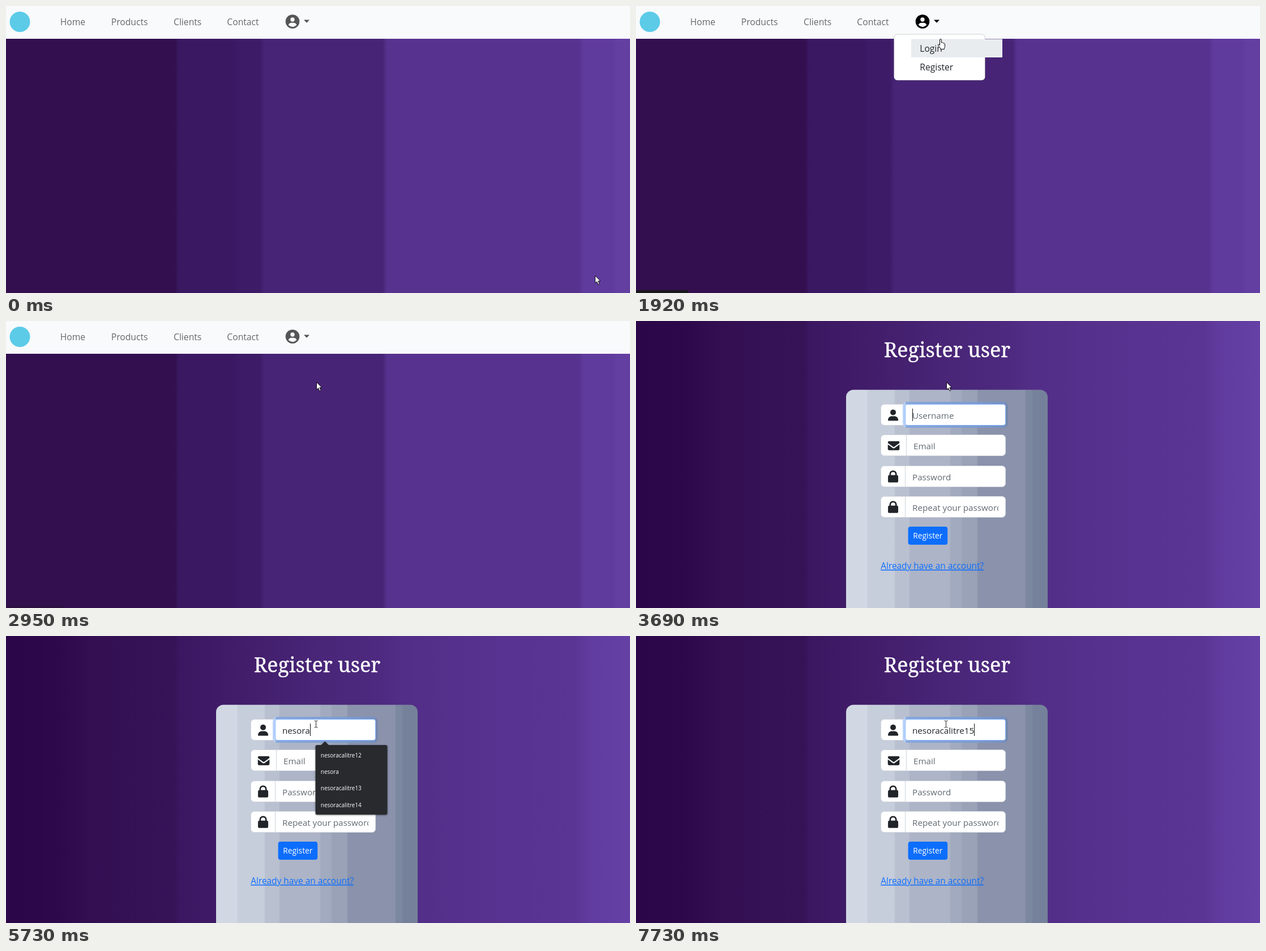
Write an HTML page that moves like this. It is 1102x508 px and loops after 8000 ms.

```html
<!DOCTYPE html>
<html lang="en">
<head>
<meta charset="utf-8">
<title>Register user</title>
<style>
  html, body { margin: 0; width: 100%; height: 100%; overflow: hidden; }
  svg { display: block; }
  #stage { width: 100vw; height: 100vh; font: 15.2px "Open Sans", "Noto Sans", sans-serif; }
  .nav { font-size: 15.7px; fill: #67686a; }
  .item { font-size: 15.6px; fill: #212529; }
  .hint { fill: #626a72; }
  .dark { fill: #212529; }
  .title { font: 36px "Noto Serif", Georgia, serif; fill: #fff; stroke: #fff; stroke-width: .4px; text-anchor: middle; }
  .link { font-size: 15.4px; fill: #0d6efd; text-decoration: underline; }
  .button { font-size: 13.8px; fill: #fff; }
  .option { font-size: 10px; fill: #fff; }
</style>
</head>
<body>
<svg id="stage" viewBox="0 0 1102 508" preserveAspectRatio="none">
  <defs>
    <linearGradient id="homeFill" gradientUnits="userSpaceOnUse" x1="0" x2="1102" y1="0" y2="0"></linearGradient>
    <linearGradient id="formFill" gradientUnits="userSpaceOnUse" x1="0" x2="1102" y1="0" y2="0"></linearGradient>
    <linearGradient id="cardFill" gradientUnits="userSpaceOnUse" x1="0" x2="1102" y1="0" y2="0"></linearGradient>
    <linearGradient id="ringFill" gradientUnits="userSpaceOnUse" x1="0" x2="1102" y1="0" y2="0"></linearGradient>
    <g id="lock">
      <path d="M-5.2-2v-2.8a5.2 5.2 0 0 1 10.4 0V-2" fill="none" stroke="#212529" stroke-width="2.7"/>
      <rect x="-9" y="-3" width="18" height="13" rx="2.6"/>
    </g>
    <g id="person">
      <circle cy="-5" r="5"/>
      <path d="M-9 8.6C-9 4.2-5.8 1.8-2 1.8H2C5.8 1.8 9 4.2 9 8.6Q9 9.8 7.8 9.8H-7.8Q-9 9.8-9 8.6Z"/>
    </g>
    <g id="mail">
      <path d="M-10.3-6q0-2 2-2H8.3q2 0 2 2 0 1-.8 1.7L.9 2q-.9.6-1.8 0L-9.5-4.3q-.8-.7-.8-1.7Z"/>
      <path d="M-10.3-2.3-1.8 4q1.8 1.2 3.6 0l8.5-6.3V5.5q0 2.5-2.5 2.5H-7.8q-2.5 0-2.5-2.5Z"/>
    </g>
  </defs>

  <g id="home">
    <rect width="1102" height="508" fill="url(#homeFill)"/>
    <rect width="1102" height="58" fill="#f8fafc"/>
    <circle cx="24.5" cy="28" r="18" fill="#5ccbe8"/>
    <g class="nav">
      <text x="95.7" y="34">Home</text>
      <text x="185.7" y="34">Products</text>
      <text x="296" y="34">Clients</text>
      <text x="390.3" y="34">Contact</text>
    </g>
    <g id="account">
      <circle cx="506" cy="27.5" r="12.3"/>
      <path d="M526 24.5h10l-5 5.3Z"/>
      <g fill="#f8fafc">
        <circle cx="506" cy="24" r="3.7"/>
        <path d="M498.7 33.8Q500 29.8 504 29.8H508Q512 29.8 513.3 33.8Q506 40 498.7 33.8Z"/>
      </g>
    </g>
    <g id="menu">
      <rect x="455.5" y="50" width="161" height="81.5" rx="6" fill="#fff" stroke="#000" stroke-opacity=".18"/>
      <rect id="loginRow" x="486" y="58.5" width="161" height="32.5"/>
      <rect id="registerRow" x="486" y="91" width="161" height="32.5"/>
      <text class="item" x="501.3" y="81">Login</text>
      <text class="item" id="registerItem" x="501.3" y="113.5">Register</text>
    </g>
    <path id="status" fill="#19181c"/>
  </g>

  <g id="form">
    <rect width="1102" height="508" fill="url(#formFill)"/>
    <text class="title" x="549.5" y="63.5">Register user</text>
    <rect x="371" y="121.7" width="356" height="410" rx="13" fill="url(#cardFill)"/>
    <g id="fields"></g>
    <rect x="473" y="145" width="182" height="42" rx="6" fill="none" stroke="url(#ringFill)" stroke-width="4"/>
    <rect x="475.5" y="147.5" width="177" height="37" rx="4" fill="#fff" stroke="#86b7fe"/>
    <text class="hint" id="userHint" x="488" y="172.8">Username</text>
    <text class="dark" id="typed" x="488" y="172.8"></text>
    <rect id="caret" y="155" width="1" height="22" fill="#111"/>
    <rect x="480.6" y="364" width="69.6" height="32" rx="4" fill="#0d6efd"/>
    <text class="button" x="489.3" y="385">Register</text>
    <text class="link" x="432.3" y="439">Already have an account?</text>
    <g id="popup">
      <path id="popupBox" fill="#292a2d" style="filter: drop-shadow(0 1px 1.5px #0006)"/>
      <g id="options"></g>
    </g>
  </g>

  <g id="arrow">
    <path d="M.5.5V13.5L3.5 10.7 5.7 15.7 8 14.7 5.8 9.8H10Z" fill="#fff" stroke="#000" stroke-width=".9"/>
  </g>
  <g id="hand">
    <path d="M3.5 11.5V2Q3.5.5 4.9.5T6.3 2V6.5Q8.3 6 8.6 7.3 10.4 6.8 10.8 8.2 12.5 8 12.5 9.8V13.5Q12.5 15 11.3 16.8V18.5H4.8V17Q2 14 .7 11.5 .3 9.6 1.8 9.7Z" fill="#fff" stroke="#000"/>
  </g>
  <g id="beam">
    <path d="M.5.5H2.5L3.5 1.5 4.5.5H6.5M3.5 1.5V11.5M.5 12.5H2.5L3.5 11.5 4.5 12.5H6.5" fill="none" stroke="#222"/>
  </g>
</svg>

<script>
const LOOP = 8000;
const NAME = "nesoracalitre";
const $ = id => document.getElementById(id);
const set = (id, attrs) => {
  for (const key in attrs) $(id).setAttribute(key, attrs[key]);
};
const show = (id, on) => set(id, { display: on ? "inline" : "none" });

const fillStops = (id, stops) => {
  $(id).innerHTML = stops.map(([x, color]) =>
    `<stop offset="${x / 1102}" stop-color="${color}"/>`).join("");
};
// Flat bands: each entry is a start position and a colour, with a short blend between.
const bands = (list, blend) => list.flatMap(([x, color], i) => [
  [x + (i ? blend : 0), color],
  [i + 1 < list.length ? list[i + 1][0] - blend : 1102, color],
]);

fillStops("homeFill", bands([
  [0, "#330f50"], [302, "#3b1862"], [407, "#3e1b67"], [452, "#472475"],
  [669, "#57328f"], [1016, "#603b9e"], [1075, "#633fa2"],
], 4));
fillStops("formFill", [
  [0, "#2b0648"], [85, "#2d084a"], [145, "#330f52"], [298, "#361257"],
  [306, "#3b1761"], [400, "#411c69"], [560, "#492678"], [664, "#4e2a80"],
  [700, "#532e88"], [860, "#57328f"], [1005, "#5a3594"], [1030, "#613c9f"],
  [1102, "#6540a5"],
]);
fillStops("cardFill", bands([
  [371, "#d1d7e3"], [409, "#c6cddb"], [457, "#b9c0d0"], [483, "#adb4c8"],
  [555, "#a1aabe"], [575, "#99a2b7"], [603, "#8a92ac"], [688, "#7c87a0"],
  [700, "#75819a"],
], 1));
fillStops("ringFill", [
  [471, "#b9d2fa"], [475, "#b9d2fa"], [477, "#88a8dc"], [600, "#7d9bd0"],
  [652, "#7690c0"], [654, "#7588ad"],
]);

const field = ([icon, split, label], i) => {
  const y = 147.5 + Math.round(i * 54.3);
  return `<rect x="432.5" y="${y}" width="220" height="37" rx="6" fill="#fff" stroke="#d3d8de"/>
    <path d="M${split} ${y}v37" stroke="#ced4da"/>
    <use href="#${icon}" class="dark" x="${(432 + split) / 2 + .3}" y="${y + 19.3}"/>
    <svg x="${split + 12.5}" y="${y}" width="${627.5 - split}" height="37">
      <text class="hint" y="25.3">${label}</text></svg>`;
};
$("fields").innerHTML = [
  ["person", 475.5, ""],
  ["mail", 477.5, "Email"],
  ["lock", 475.5, "Password"],
  ["lock", 475.5, "Repeat your password"],
].map(field).join("");

const options = [NAME + "12", NAME.slice(0, 6), NAME + "13", NAME + "14"];

const at = (kind, x, y) => ({ cursor: [kind, x, y] });
const type = (count, extra) => ({ count, caret: true, ...extra });

const start = {
  ...at("arrow", 1040, 477), page: "home", account: "#555556", menu: false,
  row: "", pressed: false, status: 0, statusAlpha: 1, count: 0, caret: true, popup: 0,
};

const steps = [
  [70, at("arrow", 925, 346)],
  [210, at("arrow", 922, 344)],
  [400, at("arrow", 956, 331)],
  [475, at("arrow", 960, 332)],
  [550, at("arrow", 931, 280)],
  [625, at("arrow", 855, 218)],
  [700, at("arrow", 768, 153)],
  [775, at("arrow", 689, 98)],
  [850, at("arrow", 628, 66)],
  [925, at("arrow", 580, 45)],
  [1000, at("arrow", 547, 33)],
  [1075, at("arrow", 530, 27)],
  [1150, { ...at("hand", 521, 24), status: 102, statusAlpha: .4, account: "#4c4c4d" }],
  [1220, { statusAlpha: .7, account: "#404041" }],
  [1300, { statusAlpha: 1, account: "#2f3031" }],
  [1510, { menu: true, account: "#000" }],
  [1780, at("hand", 525, 36)],
  [1855, { ...at("hand", 533, 58), row: "login", status: 93 }],
  [1930, at("hand", 540, 74)],
  [2005, { ...at("hand", 545, 95), row: "register", status: 105 }],
  [2080, at("arrow", 548, 108)],
  [2340, { pressed: true }],
  [2470, { menu: false, account: "#555556" }],
  [2800, { statusAlpha: .6 }],
  [2950, { statusAlpha: .2 }],
  [3690, { page: "form" }],
  [4030, at("arrow", 548, 114)],
  [4095, { ...at("arrow", 548, 125), caret: false }],
  [4160, at("arrow", 547, 137)],
  [4225, at("beam", 544, 147)],
  [4290, at("beam", 544, 149.5)],
  [4620, { caret: true }],
  [4900, type(1, { popup: 4 })],
  [4980, type(2)],
  [5230, type(3)],
  [5370, type(4)],
  [5450, type(5)],
  [5730, type(6)],
  [5930, type(7, { popup: 3 })],
  [6030, type(8)],
  [6280, type(9)],
  [6610, type(10)],
  [6810, type(11)],
  [6905, type(12)],
  [7000, type(13)],
  [7530, type(14)],
  [7730, type(15, { popup: 0 })],
];

function drawPopup(rows) {
  show("popup", rows);
  if (!rows) return;
  const height = 6 + rows * 29.3;
  set("popupBox", { d: `M549.5 193H556.5L563.2 186.5 570 193H670.5q3 0 3 3v${height - 6}
    q0 3-3 3H549.5q-3 0-3-3V196q0-3 3-3Z` });
  const visible = rows === 4 ? options : options.filter(text => text.length > 6);
  $("options").innerHTML = visible.map((text, i) =>
    `<text class="option" x="555.8" y="${214.8 + i * 29.3}">${text}</text>`).join("");
}

function draw(s) {
  show("home", s.page === "home");
  show("form", s.page === "form");
  set("account", { fill: s.account });

  show("menu", s.menu);
  const onRegister = s.row === "register";
  const blue = onRegister && s.pressed;
  set("loginRow", { fill: s.row === "login" ? "#e9ecef" : "none" });
  set("registerRow", { fill: blue ? "#0d6efd" : onRegister ? "#e9ecef" : "none" });
  $("registerItem").style.fill = blue ? "#fff" : "";

  show("status", s.status);
  set("status", { d: `M0 503H${Math.max(s.status - 3, 0)}q3 0 3 3v2H0Z`, opacity: s.statusAlpha });

  show("userHint", !s.count);
  $("typed").textContent = (NAME + "15").slice(0, s.count);
  show("caret", s.caret);
  const width = s.count ? $("typed").getComputedTextLength() : 0;
  set("caret", { x: Math.round(488 + width) });
  drawPopup(s.popup);

  const [kind, x, y] = s.cursor;
  for (const id of ["arrow", "hand", "beam"]) show(id, id === kind);
  set(kind, { transform: `translate(${x} ${y})` });
}

const began = performance.now();
let shown = -1;
function tick() {
  const time = (performance.now() - began) % LOOP;
  const passed = steps.filter(([when]) => when <= time);
  if (passed.length !== shown) {
    shown = passed.length;
    draw(Object.assign({}, start, ...passed.map(step => step[1])));
  }
  requestAnimationFrame(tick);
}
tick();
</script>
</body>
</html>
```
